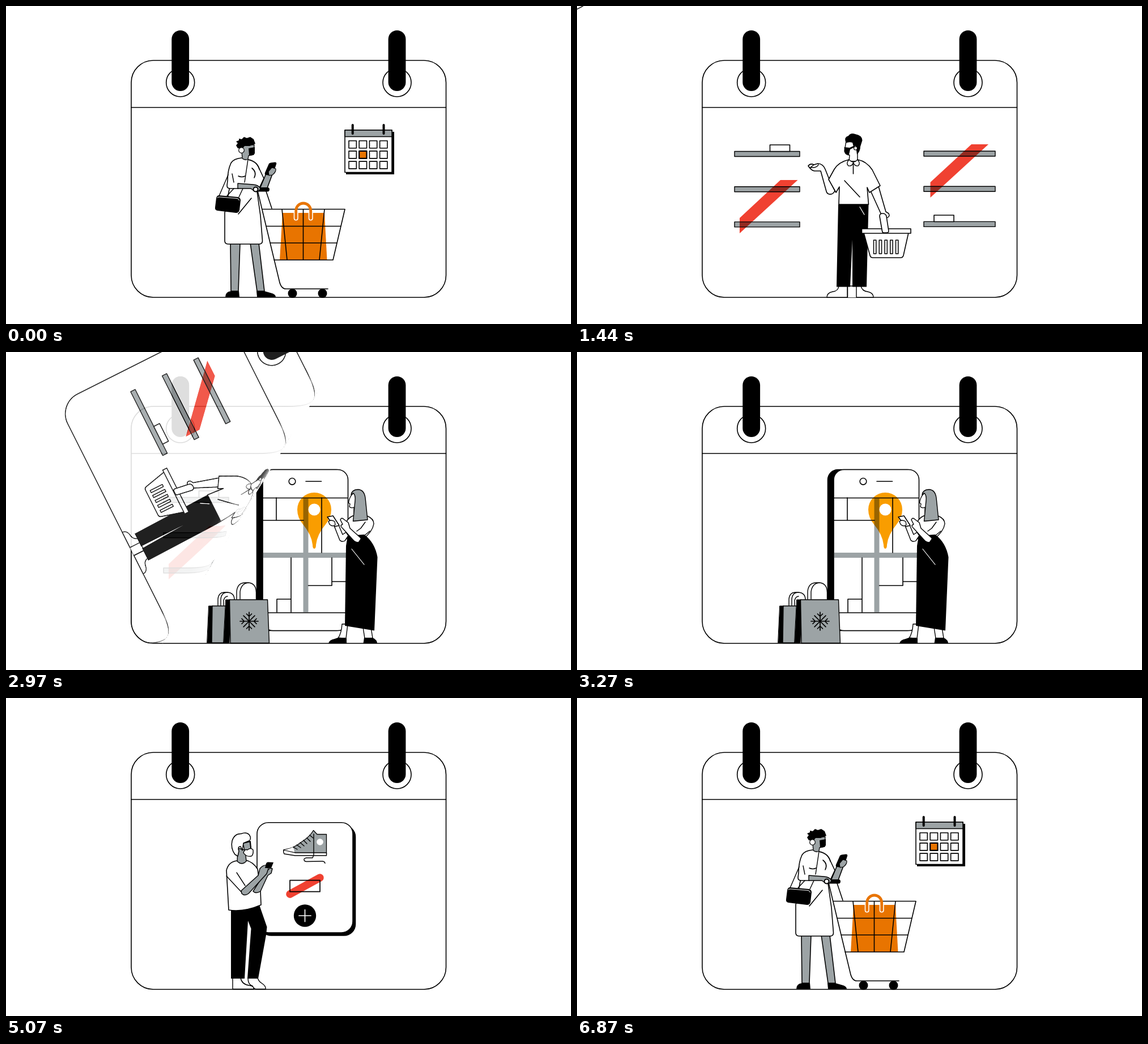
An HTML page with a canvas for the animation above (7170 ms loop, 997x561 px).

```html
<!DOCTYPE html>
<html lang="en">
<head>
<meta charset="utf-8">
<title>Calendar pages</title>
<style>
  html, body { margin: 0; width: 100%; height: 100%; overflow: hidden; background: #fff; }
  canvas { display: block; width: 997px; height: 561px; }
</style>
</head>
<body>
<canvas id="stage"></canvas>
<script>
const W = 997, H = 561, LOOP = 7170, STEP = 30;
const INK = '#000', PAPER = '#fff', GREY = '#9ca3a5', RED = '#f04131', ORANGE = '#e87400', AMBER = '#f99d00';

// Page turn: a cylinder of radius CURL whose axis is tilted by TILT.
const TILT = 0.5524, CURL = 40, FIRST_FOLD = 861, FOLD_SPEED = 43.95, TURN_STEPS = 19;
const TURN_STARTS = [900, 2700, 4500, 6300];

// ---- drawing helpers ----
function shape(g, d, fill, stroke = INK, width = 1.6) {
  const path = new Path2D(d);
  g.lineWidth = width;
  if (fill) { g.fillStyle = fill; g.fill(path); }
  if (stroke) { g.strokeStyle = stroke; g.stroke(path); }
}
const line = (g, d, color = INK, width = 1.6) => shape(g, d, null, color, width);
const solid = (g, d, color = INK) => shape(g, d, color, null);

function box(g, x, y, w, h, fill, stroke = INK, r = 0, width = 1.6) {
  g.beginPath();
  g.roundRect(x, y, w, h, r);
  g.lineWidth = width;
  if (fill) { g.fillStyle = fill; g.fill(); }
  if (stroke) { g.strokeStyle = stroke; g.stroke(); }
}
function disc(g, x, y, r, fill, stroke, width = 1.6) {
  g.beginPath();
  g.arc(x, y, r, 0, Math.PI * 2);
  g.lineWidth = width;
  if (fill) { g.fillStyle = fill; g.fill(); }
  if (stroke) { g.strokeStyle = stroke; g.stroke(); }
}
function multiply(g, draw) {
  g.globalCompositeOperation = 'multiply';
  draw();
  g.globalCompositeOperation = 'source-over';
}

// ---- pages ----
function card(g) {
  box(g, 221, 96, 555.5, 418, PAPER, INK, 39);
  line(g, 'M221 179H776.5');
  for (const x of [307.7, 690]) {
    disc(g, x, 135, 25, PAPER, INK);
    box(g, x - 15.4, 43, 30.8, 107, INK, null, 15.4);
  }
}

function wallCalendar(g) {
  box(g, 600, 222, 85, 75, INK, null);
  box(g, 598, 219, 83, 74.5, PAPER);
  box(g, 598, 219, 83, 11.5, GREY);
  line(g, 'M611.7 210V225M666.5 210V225', INK, 4);
  for (let row = 0; row < 3; row++)
    for (let col = 0; col < 4; col++) {
      const marked = row === 1 && col === 1;
      box(g, 605 + col * 18.2, 237.7 + row * 18.2, 13.3, 13, marked ? ORANGE : PAPER, INK, 0, marked ? 2.2 : 1.6);
    }
}

function trolley(g) {
  solid(g, 'M488 365H562L566.5 448H483Z', ORANGE);
  const handle = 'M511.7 374.5V361a13 13 0 0 1 26 0V374.5';
  g.save();
  g.beginPath();
  g.rect(480, 365, 90, 30);
  g.clip();
  line(g, handle, PAPER, 8);
  g.restore();
  line(g, 'M452 358.5H598L577 448H473M459.5 388.5H591M466.5 418H584' +
    'M487 358.5L496 448M524.5 358.5V448M562 358.5L553 448');
  line(g, handle, ORANGE, 4.8);
  line(g, 'M459 327L469 357M443 322L482 484Q485 499 494 499H568');
  disc(g, 505.5, 507, 8, INK);
  disc(g, 558.5, 507, 8, INK);
}

function shopper(g) {
  shape(g, 'M396 418L397 503H410L413 418ZM431 418L443 503H456L446 418Z', GREY);
  solid(g, 'M387 513.5Q387 504 397 503H411L412 513.5ZM443 513.5L442 503H456L470 507Q476 509 476 513.5Z');
  shape(g, 'M395 318L386 365V414Q386 420 392 420H447Q452.5 420 452.5 414L449 370L442 320Z', PAPER);
  line(g, 'M433 339L410 367');
  shape(g, 'M448 322L461 321L471 294L460 293Z', GREY);
  shape(g, 'M427 271Q440 273 445 283L455 304L447 321L435 318Z', PAPER);
  shape(g, 'M416 268Q402 269 397 277Q391 290 391 308L390 317Q390 322 396 322H438L436 303Q443 295 437 286Q431 280 428 271Z', PAPER, null);
  line(g, 'M416 268Q402 269 397 277Q391 290 391 308L390 317Q390 322 396 322H410M428 271Q444 275 447 288M434 286Q443 293 438 303M410 300Q416 303 422 300');
  line(g, 'M399 296L402 311M392 298L376 335M402 322L390 335M427 271L421 311M418 322L411 337', INK, 1.4);
  shape(g, 'M416 257L417 269Q422 273 427 270L428 264L437 262L438 245L418 244Z', GREY, INK, 1.3);
  solid(g, 'M428 251L439 249V260Q436 265 429 263Z');
  solid(g, 'M409 251L406 246L409 242L406 239L411 237L411 234L416 235L420 231L425 233L431 231L437 235L440 243L430 247L421 247L417 252Z');
  disc(g, 415.5, 254.5, 4.8, PAPER, INK, 1.2);
  box(g, 436, 320, 29, 7.5, INK, null, 3.7);
  shape(g, 'M409 313L436 315Q446 316 449 322Q446 329 439 327L432 322L409 322Z', GREY, INK, 1.4);
  disc(g, 440.5, 323.5, 4, PAPER, INK, 2);
  solid(g, 'M464 278Q465 277 467 276.5L475 275.5Q478 276 477 279L471 297Q470 299 467 299L458 298Q456 297 457 294Z');
  shape(g, 'M463 292L469 285L476 287Q477 293 470 298L464 299Z', GREY, INK, 1.2);
  solid(g, 'M376 334L409 337Q414 338 414 343L412 360Q411 365 406 365L373 361Q368 360 369 355L371 339Q372 334 376 334Z');
  line(g, 'M373 338Q375 336.5 378 337L408 339.5Q411 340 411.5 343', PAPER, 1);
}

function shelf(g, x, y, w, boxX) {
  for (let i = 0; i < 3; i++) box(g, x, y + i * 62.2, w, 9, GREY, INK, 0, 1.4);
  box(g, boxX, boxX < 500 ? 245 : 369, 35, 11.5, PAPER);
}

function basketMan(g) {
  shelf(g, 278, 256.5, 115, 340.5);
  shelf(g, 612, 256, 126, 630);
  multiply(g, () => solid(g, 'M359 307H389.5L287 401V374ZM696 244H726L623.5 338V311Z', RED));

  shape(g, 'M441 514Q441 506 451 504Q461 503 462 494H477V514ZM477.5 514V494H493V514M493 494H501Q503 503 513 504Q523 506 523 514H493Z', PAPER, INK, 1.4);
  solid(g, 'M461 350H514.5L511 495.5H486V412L482 495.5H458Z');
  line(g, 'M499 354.5L507 368', PAPER, 1.3);
  shape(g, 'M408 282Q412 277 418 280L425 278Q434 278 438 288L446 308L455 326Q452 333 445 332Q441 331 440 327L430 291L419 291Q413 290 408 282Z', PAPER);
  line(g, 'M411 285L418 285Q424 284 426 280M418 280L413 284');
  shape(g, 'M518 326L537 368Q539 375 546 374Q553 372 550 366L545 363L532 318Z', PAPER);
  shape(g, 'M480 271Q462 275 454 288L444 306L457 329L463 319L462 350H514.5L512 320L516 329L535 317L521 289Q511 274 495 271Z', PAPER);
  line(g, 'M472 308L499 337M487.5 276V296');
  shape(g, 'M475 238L472 256Q474 263 481 263L480 274H495V248L488 238Z', PAPER, INK, 1.4);
  shape(g, 'M480 271Q474 278 479 282Q486 283 487.5 276Q490 283 496 282Q501 278 495 271Q488 279 480 271Z', PAPER, INK, 1.4);
  solid(g, 'M471.5 249L481 250L490 246V249L482 253L480 262Q474 262 472 257Z');
  solid(g, 'M474 240Q471 231 479 229Q483 223 491 226Q503 228 503.5 237L500 248Q500 256 494 262L492 247L488 248L486 241Q480 239 474 242Z');
  disc(g, 491.5, 251, 3, PAPER, INK, 1.1);

  shape(g, 'M506 400H585L576 440Q575 444 571 444H522Q518 444 517 440Z', PAPER);
  box(g, 502.5, 393, 86.5, 8, PAPER);
  for (let i = 0; i < 5; i++) box(g, 523.5 + i * 9.75, 413, 4.3, 24, PAPER, INK, 0, 1.5);
  shape(g, 'M534 371Q534 366 539 366Q545 366 546 371L550 397Q550 400 546 400H541Q539 400 538.5 397Z', PAPER);
}

function bag(g, side, front, handles) {
  line(g, handles, INK, 1.4);
  shape(g, side, INK, INK, 1);
  shape(g, front, GREY, INK, 1.4);
}

function mapPhone(g) {
  box(g, 442.5, 207.5, 158, 284, INK, INK, 18);
  box(g, 453, 207.5, 150.5, 284, PAPER, INK, 18);
  disc(g, 505, 228.3, 5.8, null, INK);
  line(g, 'M529 228.3H556.5M453 257.5H603M453 460H603');
  solid(g, 'M524.5 258H533.5V459H524.5ZM454 354H603V363H454Z', GREY);
  line(g, 'M477 257V297M453 297H525M557 257V354M503 363V459M478 459V436H503M533.5 412H575V363M575 405H602');
  multiply(g, () => solid(g, 'M544 347Q541 347 541 340Q539 322 524 304Q514 292 514 278A30 30 0 0 1 574 278Q574 292 564 304Q549 322 547 340Q547 347 544 347Z', AMBER));
  disc(g, 544, 278, 10.5, PAPER);

  bag(g, 'M358 448H365L363 513H355Z', 'M364 448H392V513H363Z',
    'M374 447V436Q375 424 386 424H391Q403 425 403 437M379 447V436Q380 424 391 424M384 447V438Q386 431 391 431');
  solid(g, 'M407 437V423Q409 407 424 407Q441 407 441 424V437Z', PAPER);
  bag(g, 'M388 437H396L394 513H384Z', 'M394.5 437H461.5L464.5 513.5H396Z',
    'M407 436V423Q408 408 421 407H428Q441 408 441.5 424V436M413 436V423Q415 408 428 407');
  g.save();
  g.translate(429, 475);
  for (let i = 0; i < 8; i++) {
    line(g, i % 2 ? 'M0 0V-14' : 'M0 0V-16M-4.5 -13L0 -8.5L4.5 -13', INK, 1.7);
    g.rotate(Math.PI / 4);
  }
  g.restore();

  shape(g, 'M593 480Q592 496 586 505H600L603 480ZM630 486L633 505H647L644 486Z', PAPER, INK, 1.4);
  solid(g, 'M569 514Q570 508 580 506L587 503.5L601 505V514ZM630.5 514L632 504H647Q655 508 655 514Z');
  shape(g, 'M598 306Q602 293 612 289H637Q649 294 649 303Q647 317 630 330H602Z', PAPER, INK, 1.4);
  solid(g, 'M603 324L632 322Q651 336 655.5 362L650 491.5L598 483L600 342Z');
  line(g, 'M610 347.5L632 375', PAPER, 1.2);
  shape(g, 'M578 304L589 332Q593 336 598 333L604 324L600 318L594 322L586 303Z', PAPER, INK, 1.4);
  shape(g, 'M567 291L577 289L588 306L580 308Z', PAPER, INK, 1.5);
  shape(g, 'M569 299Q573 295 580 299L581 305Q576 309 571 304Z', PAPER, INK, 1.3);
  shape(g, 'M590 296Q592 291 596 295L604 301L607 311L627 329L622 336Q616 336 612 331L594 311Q588 306 594 304Z', PAPER, INK, 1.4);
  line(g, 'M626 329L642 316M619 316L626 311L634 300', INK, 1.4);
  shape(g, 'M613 249Q606 255 604.5 266L607 268L606 273Q609 276 614 274V288L622 290L625 250Z', PAPER, INK, 1.3);
  shape(g, 'M609 252Q610 243 621 242.5Q632 243 634 257L638 296L612.5 298.5L616 262Q617 253 613 249Z', GREY, INK, 1.4);
}

function sneaker(g) {
  shape(g, 'M490 268Q508 265 520 255Q536 245 542.5 233.5L549 240.5H565.5V276H510Z', GREY, INK, 1.3);
  shape(g, 'M490 268L511 273H565.5V278H510L491 275Q489 272 490 268Z', PAPER, INK, 1.4);
  solid(g, 'M491 268Q501 266 506 263Q509 267 509 272Z', PAPER);
  disc(g, 554, 254, 5.8, PAPER);
  line(g, 'M507 263L514 267M513 259L520 264M519 255L526 261M525 251L531 257M531 247L537 253M536 242L542 247', INK, 1.4);
  line(g, 'M543 240V277L541 282H530Q525 283 526 286Q527 289 531 288.5L558 288Q562 288 563 291.5', INK, 1.4);
}

function shoeOrder(g) {
  box(g, 448, 225, 168.5, 194, INK, INK, 20);
  box(g, 443, 219.7, 169, 194.3, PAPER, INK, 20);
  sneaker(g);
  line(g, 'M501 346L554 317', RED, 13.5);
  box(g, 501, 321.7, 53, 20, null, INK, 0, 1.7);
  disc(g, 527.5, 384, 19.7, INK);
  line(g, 'M517 384H538M527.5 373.5V394.5', PAPER, 1.7);

  shape(g, 'M400 494V513.5H437Q438 508 429 507Q416 505 414 494ZM427 494Q427 506 435 508Q438 513.5 441 513.5H458Q459 508 451 503Q446 500 444 494Z', PAPER, INK, 1.4);
  solid(g, 'M397 373L447 365L460.5 404L459 418L445 495H426L432.5 407L427 393L421 495H397Z');
  shape(g, 'M409 287Q393 288 389 304L393 374Q420 378 450 365L449 340L444 302Q436 289 423 286Z', PAPER);
  shape(g, 'M457 308L466 300L470 301L468 309L462 313L449 341Q441 346 436 341Z', GREY, INK, 1.4);
  shape(g, 'M409 265L408 288Q416 296 424 288L423 277L430 270Z', GREY, INK, 1.4);
  line(g, 'M389 314L416 343M407 308L422 331', INK, 1.4);
  shape(g, 'M415 340L445 313L448 301Q454 294 460 295L463 301L460 310L428 345Q421 350 416 345Z', GREY, INK, 1.4);
  solid(g, 'M459 292Q460 289.5 462 289.5L472 290L468 300L457 300Z');
  shape(g, 'M418 256L430 253L433 268L422 272Z', GREY, INK, 1.2);
  line(g, 'M418 256L431 253L432 265', INK, 2);
  shape(g, 'M404 276Q396 265 399 252Q403 239 415 239.5Q424 236 429 241Q434 248 429 252L419 256L417 269L414 262Q408 262 411 270L409 279Z', PAPER, INK, 1.5);
  shape(g, 'M419 273Q421 266 426 268Q432 263 436 268Q437 276 433 279Q424 281 419 273Z', PAPER, INK, 1.4);
}

const contents = [g => { wallCalendar(g); trolley(g); shopper(g); }, basketMan, mapPhone, shoeOrder];

function drawPage(g, index) {
  g.lineJoin = g.lineCap = 'round';
  card(g);
  contents[index](g);
}

// ---- surfaces ----
function surface(canvas, scale) {
  canvas.width = Math.round(W * scale);
  canvas.height = Math.round(H * scale);
  const g = canvas.getContext('2d');
  g.scale(scale, scale);
  return g;
}
const density = window.devicePixelRatio || 1;
const stage = surface(document.getElementById('stage'), density);
const layer = surface(document.createElement('canvas'), density);
const sheets = contents.map((_, i) => {
  const g = surface(document.createElement('canvas'), 2);
  drawPage(g, i);
  return g.canvas;
});

// ---- page turn ----
// Maps the slice a..b of the sheet, measured across the fold, to from..to on the stage.
function slice(sheet, a, b, from, to) {
  layer.save();
  layer.rotate(TILT);
  layer.beginPath();
  layer.rect(Math.min(from, to) - 0.4, -1500, Math.abs(to - from) + 0.8, 3000);
  layer.clip();
  layer.translate(from, 0);
  layer.scale((to - from) / (b - a), 1);
  layer.translate(-a, 0);
  layer.rotate(-TILT);
  layer.drawImage(sheet, 0, 0, W, H);
  layer.restore();
}

function bend(sheet, fold, start, end) {
  const parts = 36;
  const angle = i => start + (end - start) * i / parts;
  for (let i = 0; i < parts; i++) {
    const p = angle(i), q = angle(i + 1);
    slice(sheet, fold + CURL * p, fold + CURL * q, fold + CURL * Math.sin(p), fold + CURL * Math.sin(q));
  }
}

function gloss(fold, stops) {
  layer.save();
  layer.rotate(TILT);
  layer.globalCompositeOperation = 'source-atop';
  const shine = layer.createLinearGradient(fold, 0, fold + CURL, 0);
  for (const [at, alpha] of stops) shine.addColorStop(at, `rgba(255,255,255,${alpha})`);
  layer.fillStyle = shine;
  layer.fillRect(fold, -1500, CURL + 2, 3000);
  layer.restore();
}

function stamp(alpha) {
  stage.globalAlpha = alpha;
  stage.drawImage(layer.canvas, 0, 0, W, H);
  stage.globalAlpha = 1;
}

function turnPage(sheet, fold) {
  const far = 2000, half = Math.PI / 2;

  layer.clearRect(0, 0, W, H);
  slice(sheet, fold - far, fold, fold - far, fold);
  bend(sheet, fold, 0, half);
  gloss(fold, [[0, 0], [0.4, 0.05], [1, 0.6]]);
  stamp(1);

  layer.clearRect(0, 0, W, H);
  const back = fold + Math.PI * CURL;
  slice(sheet, back, back + far, fold, fold - far);
  bend(sheet, fold, Math.PI, half);
  gloss(fold, [[0, 0], [0.25, 0.03], [0.52, 0.5], [0.7, 0.15], [0.85, 0.2], [1, 0.6]]);
  stamp(0.87);
}

function render(time) {
  const turn = TURN_STARTS.filter(start => time >= start).length - 1;
  const step = turn < 0 ? TURN_STEPS : Math.floor((time - TURN_STARTS[turn]) / STEP);
  stage.fillStyle = PAPER;
  stage.fillRect(0, 0, W, H);
  drawPage(stage, (turn + 1) % 4);
  if (step < TURN_STEPS) turnPage(sheets[turn], FIRST_FOLD - FOLD_SPEED * step);
}

const origin = performance.now();
function tick() {
  render((performance.now() - origin) % LOOP);
  requestAnimationFrame(tick);
}
tick();
</script>
</body>
</html>
```
